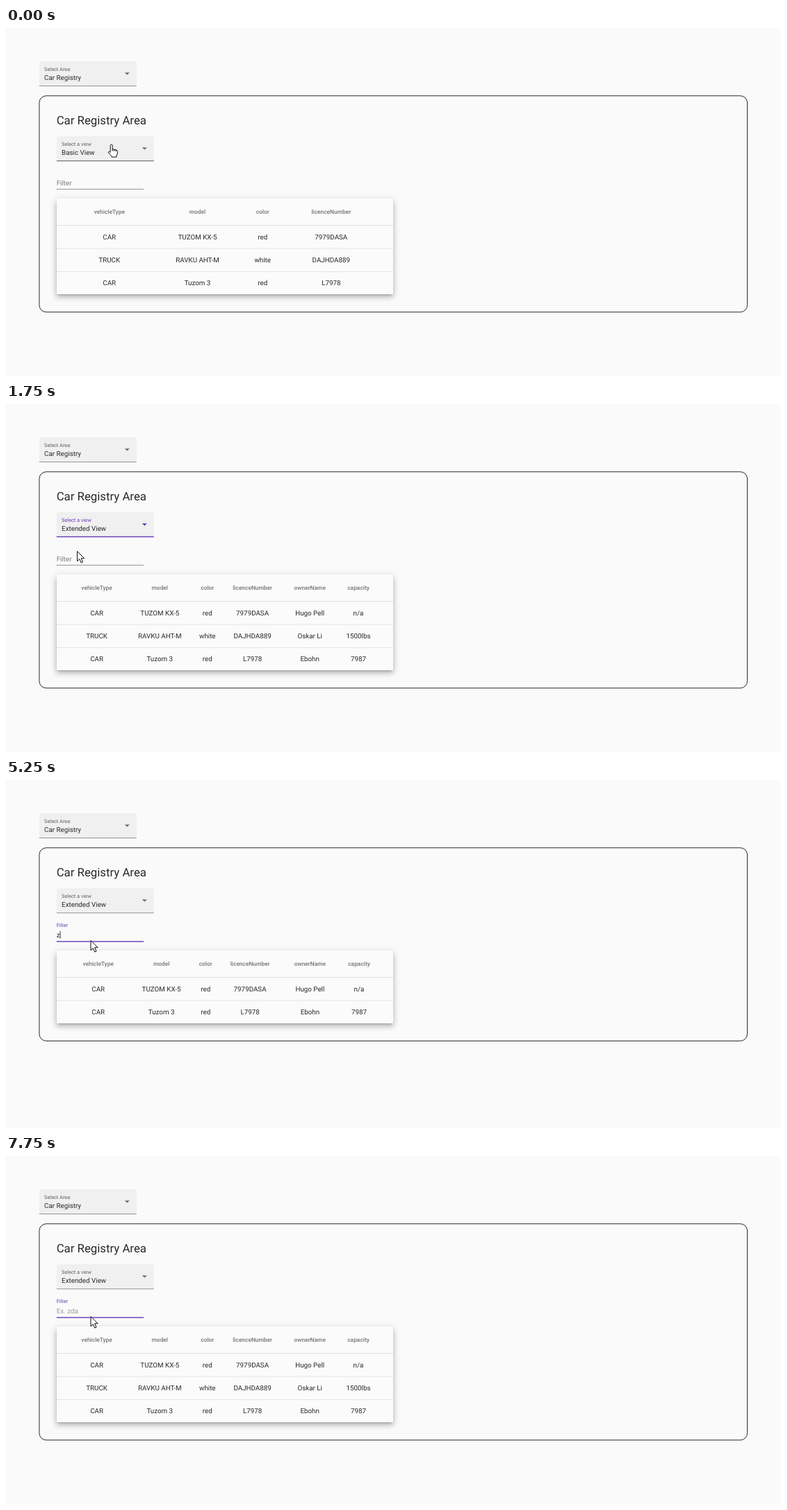
Recreate the animation shown at these times as an HTML page. Size 1115x502 px, loop 8000 ms.

```html
<!DOCTYPE html>
<html lang="en">
<head>
<meta charset="utf-8">
<title>Car Registry</title>
<style>
  html, body { margin: 0; width: 100%; height: 100%; overflow: hidden; background: #fafafa; }
  svg { display: block; width: 1115px; height: 502px; font: 9.8px Roboto, sans-serif; fill: rgba(0,0,0,.84); }
  text { text-rendering: geometricPrecision; white-space: pre; }
  foreignObject { overflow: visible; }
  foreignObject div { height: 100%; }
  .cell { text-anchor: middle; }
  .head { font-size: 8.4px; font-weight: 500; fill: rgba(0,0,0,.54); }
  .title { font-size: 16.8px; }
  .label { font-size: 7.35px; fill: rgba(0,0,0,.6); }
  .empty { fill: rgba(0,0,0,.5); }
  .hint { fill: rgba(0,0,0,.38); }
  .purple { fill: #673ab7; }
  .panel { fill: none; stroke: #000; stroke-width: .85; }
  .table { background: #fbfbfb; box-shadow: 0 3.5px 3.5px -2px rgba(0,0,0,.2),
    0 5.6px 7px .7px rgba(0,0,0,.14), 0 2px 9.8px 1.4px rgba(0,0,0,.12); }
  .menu { background: #fdfdfd; border-radius: 3px; box-shadow: 0 1.4px 2.8px -.7px rgba(0,0,0,.2),
    0 2.8px 3.5px rgba(0,0,0,.14), 0 .7px 7px rgba(0,0,0,.12); }
  .pointer { fill: #fff; stroke: #000; stroke-width: .95; stroke-linejoin: round; }
</style>
</head>
<body>
<svg id="stage" viewBox="0 0 1115 502"></svg>
<script>
const STEP = 250, STEPS = 32;
const GREY = 'rgba(0,0,0,.54)', LINE = 'rgba(0,0,0,.5)', PURPLE = '#673ab7';
const ROW = 33.4;

const vehicles = [
  ['CAR', 'TUZOM KX-5', 'red', '7979DASA', 'Hugo Pell', 'n/a'],
  ['TRUCK', 'RAVKU AHT-M', 'white', 'DAJHDA889', 'Oskar Li', '1500lbs'],
  ['CAR', 'Tuzom 3', 'red', 'L7978', 'Ebohn', '7987'],
];
const headers = ['vehicleType', 'model', 'color', 'licenceNumber', 'ownerName', 'capacity'];
const columns = {
  basic: [148.7, 275.5, 369.2, 467.8],
  extended: [130.6, 221.3, 289.8, 354.6, 437.2, 507],
  filtered: [132.7, 223.6, 287.2, 351.1, 437.4, 508],
};

// Pointer stops: [step, x, y]; each one holds until the next.
const stops = [
  [0, 146.6, 167.6], [1, 146, 169], [2, 141, 172], [3, 129, 174], [4, 115, 190], [5, 102, 206],
  [6, 101, 212], [7, 102, 212], [8, 105, 208], [9, 114, 194], [10, 122, 182], [11, 121, 181],
  [13, 119.5, 205], [14, 121, 221], [15, 121.5, 231],
];
const typed = [[0, ''], [20, 'z'], [22, 'zd'], [23, 'zda'], [28, 'zd'], [29, 'z'], [30, '']];

const current = (list, step) => list.filter(item => item[0] <= step).pop();

const rect = (x, y, w, h, fill, radius = 0) =>
  `<rect x="${x}" y="${y}" width="${w}" height="${h}" rx="${radius}" fill="${fill}"/>`;
const card = (x, y, w, h, cls) =>
  `<foreignObject x="${x}" y="${y}" width="${w}" height="${h}"><div class="${cls}"></div></foreignObject>`;
const text = (x, baseline, str, cls = '') =>
  `<text x="${x}" y="${baseline}" class="${cls}">${str}</text>`;

function select(x, y, label, value, focused, hovered) {
  const underline = focused ? PURPLE : hovered ? 'rgba(0,0,0,.8)' : LINE;
  const weight = focused ? 1.4 : .8;
  return rect(x, y, 140, 36, '#f0f0f0', 2.5) +
    text(x + 7.3, y + 13.9, label, focused ? 'label purple' : 'label') +
    text(x + 7.3, y + 26.9, value) +
    `<path d="M${x + 123} ${y + 16.2}h7l-3.5 3.5z" fill="${focused ? PURPLE : GREY}"/>` +
    rect(x, y + 36.1 - weight, 140, weight, underline);
}

function filterField(step) {
  const x = 72.7, baseline = 226.8;
  if (step < 16) return text(x, baseline, 'Filter', 'empty') + rect(x, 232.2, 125.4, .8, LINE);
  const value = current(typed, step)[1];
  const caretOn = step === 17 || (step >= 20 && step < 30 && step !== 26);
  const caretX = x + value.length * 5.2 - .3;
  return text(x, 212, 'Filter', 'label purple') +
    (value ? text(x, baseline, value) : text(x, baseline, 'Ex. zda', 'hint')) +
    (caretOn ? rect(caretX, 218, .9, 11, '#222') : '') +
    rect(x, 232.3, 125.4, 1.4, PURPLE);
}

function table(rows, xs) {
  const x = 72.6, top = 246, headBottom = 284.2, width = 484.5;
  let html = card(x, top, width, headBottom - top + rows.length * ROW, 'table');
  xs.forEach((cx, i) => html += text(cx, 268.2, headers[i], 'cell head'));
  rows.forEach((row, r) => {
    html += rect(x, headBottom + r * ROW, width, .8, 'rgba(0,0,0,.13)');
    xs.forEach((cx, i) => html += text(cx, 304.6 + r * ROW, row[i], 'cell'));
  });
  return html;
}

function menu(hoverSecond) {
  return card(69, 165, 147, 58.5, 'menu') + rect(69, 165, 147, 29, '#e0e0e0', 2) +
    (hoverSecond ? rect(69, 194, 147, 29.5, '#f5f5f5', 2) : '') +
    text(80.3, 183.2, 'Basic View', 'purple') + text(80.3, 212.3, 'Extended View');
}

function pointer(step) {
  const [, x, y] = current(stops, step);
  const hand = step < 6 || (step >= 9 && step <= 12);
  const shape = hand
    ? '<path d="M3.6 11V2a1.5 1.5 0 0 1 3 0v5.2l5 1q2.2.5 2.2 2.6v3l-1.4 3.4v1.3H5.4v-1.3L1.2 13q-1.2-1.8.2-2.3 1.1-.2 2.2 1.3z"/><path fill="none" d="M6.6 7v3M9.1 7.8v2.4M11.6 8.3v2.2"/>'
    : '<path d="M.5.5V14.7L3.8 11.6 6.2 17 8.5 16 6.2 10.7H10.6z"/>';
  return `<g class="pointer" transform="translate(${x} ${y})">${shape}</g>`;
}

function scene(step) {
  const extended = step >= 6, open = step >= 2 && step < 6;
  const filtered = step >= 21 && step < 31;
  const rows = filtered ? [vehicles[0], vehicles[2]] : vehicles;
  const xs = filtered ? columns.filtered : extended ? columns.extended : columns.basic;
  return select(47.8, 48, 'Select Area', 'Car Registry') +
    `<rect class="panel" x="47.9" y="97.8" width="1018.6" height="${211.8 + rows.length * ROW}" rx="10"/>` +
    text(72.7, 139.3, 'Car Registry Area', 'title') +
    select(72.8, 156.1, 'Select a view', extended ? 'Extended View' : 'Basic View',
      step >= 2 && step < 16, step < 2) +
    filterField(step) + table(rows, xs) +
    (open ? menu(step >= 5) : '') + pointer(step);
}

const stage = document.getElementById('stage');
let shown = -1;
function frame(now) {
  const step = Math.floor(now / STEP) % STEPS;
  if (step !== shown) stage.innerHTML = scene(shown = step);
  requestAnimationFrame(frame);
}
frame(performance.now());
</script>
</body>
</html>
```
